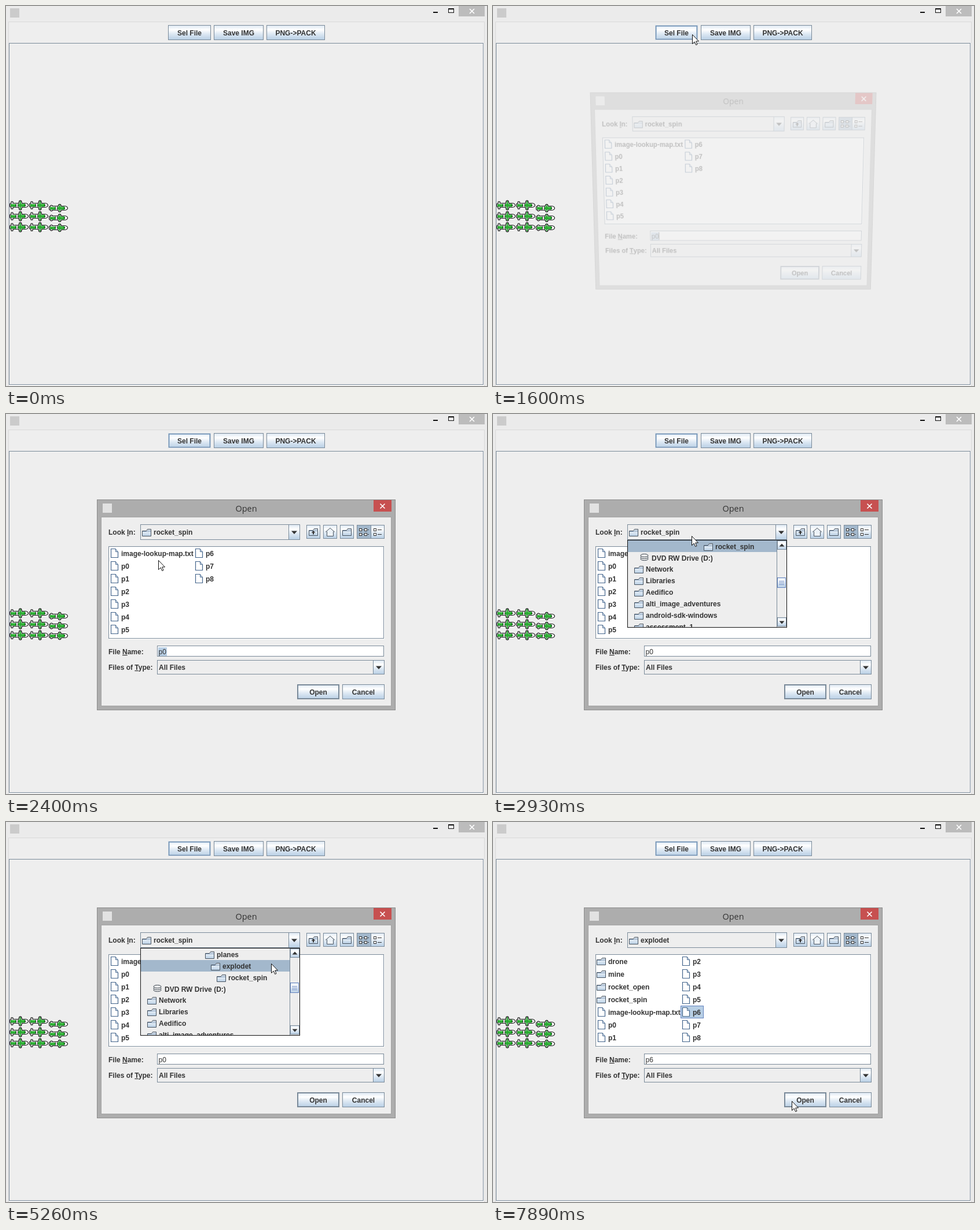
Write an HTML page that moves like this. It is 831 by 658 pixels and loops after 8 s.

```html
<!DOCTYPE html>
<html lang="en">
<head>
<meta charset="utf-8">
<title>Sprite packer</title>
<style>
  html, body { margin: 0; width: 100%; height: 100%; overflow: hidden; background: #ebebeb; }
  svg.layer { position: absolute; left: 0; top: 0; width: 831px; height: 658px; }
  svg { font: bold 12px "Liberation Sans", Arial, sans-serif; }
  text { fill: #333; white-space: pre; }
  .plain { font-weight: normal; }
  .title { font: 14.5px "Open Sans", "Noto Sans", sans-serif; }
  u, .u { text-decoration: underline; }
  #dialog { transform-origin: 415px 330.5px; }
</style>
</head>
<body>
<svg class="layer" id="main">
  <defs>
    <linearGradient id="ocean" x2="0" y2="1">
      <stop offset="0" stop-color="#dde8f3"/><stop offset=".3" stop-color="#fff"/>
      <stop offset=".6" stop-color="#dde8f3"/><stop offset="1" stop-color="#b8cfe5"/>
    </linearGradient>
    <linearGradient id="tint" x2="0" y2="1">
      <stop offset="0" stop-color="#fff"/><stop offset="1" stop-color="#b8cfe5"/>
    </linearGradient>
  </defs>
</svg>
<svg class="layer" id="dialog"></svg>
<svg class="layer" id="pointer"></svg>
<script>
const EDGE = '#7a8a99', PANE = '#eee', BLUE = '#a3b8cc', SELECT = '#b8cfe5', OCEAN = 'url(#ocean)';
const byId = id => document.getElementById(id);

// Shapes
const rect = (x, y, w, h, fill, more = '') =>
  `<rect x="${x}" y="${y}" width="${w}" height="${h}" fill="${fill}" ${more}/>`;
const box = (x, y, w, h, fill, stroke = EDGE, more = '') =>
  rect(x + .5, y + .5, w - 1, h - 1, fill, `stroke="${stroke}" ${more}`);
const path = (d, fill = 'none', stroke = 'none', more = '') =>
  `<path d="${d}" fill="${fill}" stroke="${stroke}" ${more}/>`;
const text = (x, y, s, more = '') => `<text x="${x}" y="${y}" ${more}>${s}</text>`;
const group = (id, body) => `<g id="${id}">${body}</g>`;
const at = (x, y, body) => `<g transform="translate(${x} ${y})">${body}</g>`;
const key = c => `<tspan class="u">${c}</tspan>`;
const label = (x, y, w, s) => text(x + w / 2, y + 18, s, 'text-anchor="middle"');
const button = (x, y, w, s) => box(x, y, w, 26, OCEAN) + label(x, y, w, s);
const cross = (x, y) => path(`M${x - 4} ${y - 4}l8 8m0 -8l-8 8`, 'none', '#fff', 'stroke-width="1.7"');

const folder = (x, y) => at(x, y,
  path('M.5 4.5H7.5L9.5 1.5H15.5V13.5H.5Z', 'url(#tint)', '#47525e') +
  path('M9 3.5H15M1 5.5H15', 'none', '#8aa3c0'));
const page = (x, y) => at(x, y,
  path('M.5 .5H8L12.5 6V15.5H.5Z', '#fff', '#44658c', 'stroke-width="1.2"') +
  path('M8 .5Q9 3 8.6 5.5Q11 5 12.5 6', '#dde8f3', '#44658c'));
const disks = (x, y) => at(x, y, [9, 6, 3].map(cy =>
  `<ellipse cx="7.5" cy="${cy}" rx="6.5" ry="2.6" fill="#eee" stroke="#3c4650"/>`).join(''));

const combo = (x, y, w, h, s, tx) =>
  box(x, y, w, h, PANE) + box(x + w - 20, y, 20, h, OCEAN) +
  path(`M${x + w - 15} ${y + h / 2 - 2}h10l-5 5.5z`, '#333') + text(tx, y + h / 2 + 4.5, s);

function plane(x, y, span) {
  const s = span, outline = 'stroke-width="1.2" stroke-linejoin="round"';
  return at(x, y,
    path(`M1 -3H3V${2 - s}Q4.5 ${1 - s} 6 ${2 - s}V-3.5H16L17 ${.5 - s}Q19 ${-.8 - s} 20.5 ${.5 - s}` +
         `L21.5 -3.5H28Q32 -3 32.5 0Q32 3 28 3.5H21.5L20.5 ${s - .5}Q19 ${s + .8} 17 ${s - .5}L16 3.5H6` +
         `V${s - 2}Q4.5 ${s - 1} 3 ${s - 2}V3H1Q0 0 1 -3Z`, '#fff', '#111', outline) +
    rect(2, -2, 9, 4.5, '#129a1c') + rect(15, -2.5, 12, 5, '#129a1c') +
    rect(3, -1, 7, 1.2, '#5fd45f') + rect(16, -1, 9, 1.2, '#5fd45f') +
    rect(17.7, -s + 1, 2.2, 2 * s - 2, '#2aa834') + rect(11, -2.5, .9, 5, '#222') +
    rect(13.8, -2.5, .9, 5, '#222') + rect(27, -1.5, 1, 3, '#222'));
}

function mainWindow() {
  let s = rect(0, 0, 831, 658, '#ebebeb') + box(4, 27, 823, 640, PANE, '#d9d9d9') +
    rect(7, 4, 16, 16, '#cbcbcb') +
    rect(738, 10, 8, 2, '#111') + box(764, 4, 10, 8, 'none', '#111') + rect(764, 4, 10, 2, '#111') +
    rect(782, 0, 45, 18, '#bcbcbc') + cross(805, 9) +
    box(5, 64, 820, 592, PANE) + rect(5, 656, 821, 1, '#fff') + rect(825, 64, 1, 593, '#fff') +
    button(280, 33, 74, 'Sel File') + button(359, 33, 86, 'Save IMG') + button(450, 33, 101, 'PNG-&gt;PACK');
  s += group('hover', box(280, 33, 74, 26, 'none', '#c8d6e4') + box(281, 34, 72, 24, 'none', '#6382a5') +
    box(282, 35, 70, 22, 'none', SELECT));
  s += group('press', box(280, 33, 74, 26, BLUE) + label(280, 33, 74, 'Sel File'));
  for (let r = 0; r < 3; r++)
    s += plane(6, 345 + 19 * r, 8) + plane(40, 345 + 19 * r, 8) + plane(74, 350 + 17 * r, 6.5);
  return s;
}

// File list: folder names end with a slash
function listing(names) {
  return names.map((n, i) => {
    const x = i < 7 ? 0 : 146, y = i % 7 * 22, dir = n.endsWith('/');
    return (dir ? folder(179 + x, 234 + y) : page(181 + x, 233 + y)) +
      text(199 + x, 246 + y, n.replace('/', ''));
  }).join('');
}
const range = (a, b) => Array.from({ length: b - a + 1 }, (_, i) => 'p' + (a + i));

function toolButtons() {
  const small = x => box(x, 192, 24, 24, OCEAN);
  const cells = [[610, 198], [619, 198], [610, 206], [619, 206]].map(([x, y]) =>
    box(x, y, 5, 5, '#fff', '#333') + rect(x + 6, y + 2, 2, 1, '#333')).join('');
  const lines = [198, 206].map(y => box(635, y, 5, 5, '#fff', '#333') + rect(642, y + 2, 7, 1, '#333')).join('');
  return small(519) + folder(523, 197) + path('M531 202l3.5 3.5h-2.5v3h-2v-3h-2.5z', '#333') +
    small(548) + path('M552 204.5L560 197.5L568 204.5M554.5 203.5V211.5H565.5V203.5', '#eef3f8', '#47525e') +
    small(577) + folder(581, 197) +
    box(606, 192, 25, 24, BLUE) + cells + box(630, 192, 24, 24, OCEAN) + lines;
}

function popup() {
  const rows = [[-40, 111, 'planes'], [-20, 121, 'explodet'], [0, 131, 'rocket_spin'], [20, 21, 'DVD RW Drive (D:)'],
    ...['Network', 'Libraries', 'Aedifico', 'alti_image_adventures', 'android-sdk-windows', 'assessment_1']
      .map((n, i) => [39 + 20 * i, 11, n])];
  const items = rows.map(([y, x, n]) =>
    (n.startsWith('DVD') ? disks(x, y + 3) : folder(x, y + 4)) + text(x + 20, y + 15, n)).join('');
  const arrow = (y, d) => box(491, y, 16, 16, OCEAN) + path(d, '#333');
  return box(232, 218, 276, 152, PANE, '#111') +
    '<svg x="233" y="219" width="257" height="150" overflow="hidden">' +
    group('rows', rect(0, 0, 257, 20, BLUE, 'id="mark"') + items) + '</svg>' +
    rect(490, 219, 1, 150, EDGE) +
    arrow(219, 'M494.5 229.5h9l-4.5 -5z') + arrow(352, 'M494.5 358.5h9l-4.5 5z') +
    group('upPress', box(491, 219, 16, 16, BLUE) + path('M494.5 229.5h9l-4.5 -5z', '#333')) +
    group('thumb', box(491, 0, 15, 18, OCEAN, '#6382bf') +
      [6, 9, 12].map(y => rect(494, y, 9, 1, '#6382bf')).join(''));
}

function dialogWindow() {
  return box(157, 148, 516, 365, '#adadad', '#8c8c8c') + rect(167, 155, 16, 16, '#e2e2e2') +
    text(415, 169, 'Open', 'class="title" text-anchor="middle"') +
    rect(635, 149, 31, 20, '#c75050') + cross(650.5, 159.5) +
    box(164, 178, 502, 328, PANE, '#a2a2a2') +
    text(177, 209, `Look ${key('I')}n:`) + combo(232, 191, 276, 27, '', 255) + folder(235, 198) +
    `<text id="dir" x="255" y="209"></text>` + box(234, 193, 253, 23, 'none', BLUE, 'id="focus"') + toolButtons() +
    rect(178, 230, 476, 160, '#fff') + box(177, 229, 476, 160, '#fff') +
    group('spinList', listing(['image-lookup-map.txt', ...range(0, 8)])) +
    group('planeList', box(324, 318, 40, 22, SELECT, '#6382bf', 'id="chosen"') +
      listing(['drone/', 'mine/', 'rocket_open/', 'rocket_spin/', 'image-lookup-map.txt', ...range(0, 8)])) +
    text(177, 416, `File ${key('N')}ame:`) + box(261, 401, 392, 19, '#fff') +
    rect(263, 404, 15, 15, SELECT, 'id="range"') + '<text id="name" class="plain" x="263.5" y="416"></text>' +
    rect(277, 404, 1, 14, '#333', 'id="caret"') +
    text(177, 443, `Files of ${key('T')}ype:`) + combo(261, 426, 393, 25, 'All Files', 264) +
    button(503, 468, 73, 'Open') + box(504, 469, 71, 24, 'none') + button(581, 468, 73, 'Cancel') +
    group('popup', popup());
}

byId('main').innerHTML += mainWindow();
byId('dialog').innerHTML = dialogWindow();
byId('pointer').innerHTML = group('arrow',
  path('M.5 .5V16.5L4.2 13L6.7 18.5L9 17.5L6.7 12H11.5Z', '#fff', '#111'));

// Pointer moves: start, end, steps, then from and to
const MOVES = [
  [70, 760, 11, 711, 628, 345, 49],
  [990, 990, 1, 345, 49, 344, 49],
  [2010, 2400, 6, 344, 49, 263, 253],
  [2560, 2700, 3, 263, 253, 343, 211],
  [3480, 4250, 11, 343, 211, 499, 225],
  [5110, 5260, 3, 499, 225, 458, 245],
  [5960, 6580, 9, 458, 245, 341, 336],
  [7510, 7890, 6, 341, 336, 516, 483]
];
// Dialog opening: time, tilt, opacity
const OPENING = [[1600, 3, .25], [1670, 2, .55], [1730, 1, .82], [1780, .35, .95], [1860, 0, 1]];

const last = (table, t) => table.filter(r => r[0] <= t).pop();
const show = (id, on) => { byId(id).style.display = on ? '' : 'none'; };
const within = (t, a, b) => t >= a && t < b;

function pointerAt(t) {
  const [a, b, n, x0, y0, x1, y1] = last(MOVES, t) || MOVES[0];
  const step = n > 1 ? Math.min(n, Math.floor((t - a) * (n - 1) / (b - a) + 1e-6) + 1) : 1;
  const p = step / n, e = p * p * (3 - 2 * p);
  return [Math.round(x0 + (x1 - x0) * e), Math.round(y0 + (y1 - y0) * e)];
}

function render(t) {
  show('arrow', t >= 70);
  byId('arrow').setAttribute('transform', `translate(${pointerAt(t)})`);
  show('hover', t >= 690);
  show('press', within(t, 1310, 1460));

  const open = last(OPENING, t), dialog = byId('dialog');
  show('dialog', open);
  if (!open) return;
  const [, k, alpha] = open;
  dialog.style.opacity = alpha;
  dialog.style.transform = k
    ? `translateY(${-2.3 * k}px) perspective(1000px) scale(${1 - .02 * k}) rotateX(${-2.1 * k}deg)` : 'none';

  show('range', t < 2930);
  show('caret', t < 2090 || within(t, 2560, 2930));
  show('popup', within(t, 2930, 5650));
  const scroll = t < 4330 ? 0 : t < 4710 ? 20 : 40;
  byId('rows').setAttribute('transform', `translate(0 ${scroll})`);
  byId('mark').setAttribute('y', t < 5110 ? 0 : t < 5180 ? -40 : -20);
  byId('thumb').setAttribute('transform', `translate(0 ${Math.round(283 - scroll / 8)})`);
  show('upPress', within(t, 4330, 4410) || within(t, 4710, 4880));

  show('spinList', t < 5650);
  show('planeList', t >= 5650);
  show('focus', within(t, 5650, 6730));
  show('chosen', t >= 6730);
  byId('dir').textContent = t < 5650 ? 'rocket_spin' : 'explodet';
  byId('name').textContent = t < 6820 ? 'p0' : 'p6';
}

const start = performance.now();
(function tick() {
  render((performance.now() - start) % 8000);
  requestAnimationFrame(tick);
})();
</script>
</body>
</html>
```
